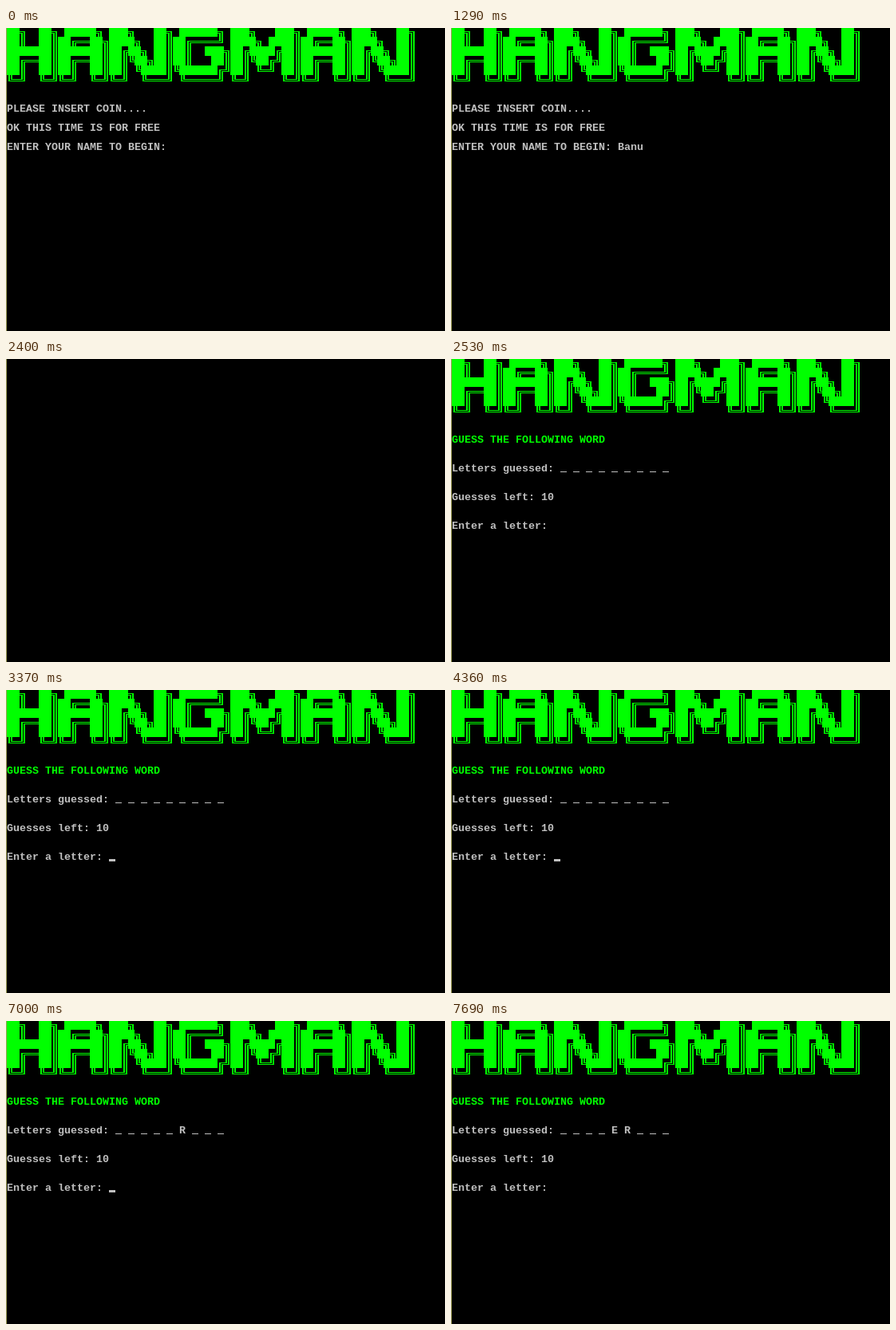
Recreate the animation shown at these times as an HTML page with a canvas. Size 550x380 px, loop 8000 ms.

```html
<!DOCTYPE html>
<html lang="en">
<head>
<meta charset="utf-8">
<title>Hangman console</title>
<style>
  html, body { margin: 0; width: 100%; height: 100%; overflow: hidden; background: #000; }
  canvas { display: block; }
</style>
</head>
<body>
<canvas id="stage" width="550" height="380"></canvas>
<script>
const ctx = document.getElementById('stage').getContext('2d');
const LOOP = 8000;
const CELL_W = 8, CELL_H = 12, LEFT = 1, TOP = -1;
const GREEN = '#00ff00', GREY = '#c0c0c0', EDGE = '#a0a058';
const PLAYER = 'Banuvo';

const BANNER = [
  '██╗  ██╗ █████╗ ███╗   ██╗ ██████╗ ███╗   ███╗ █████╗ ███╗   ██╗',
  '██║  ██║██╔══██╗████╗  ██║██╔════╝ ████╗ ████║██╔══██╗████╗  ██║',
  '███████║███████║██╔██╗ ██║██║  ███╗██╔████╔██║███████║██╔██╗ ██║',
  '██╔══██║██╔══██║██║╚██╗██║██║   ██║██║╚██╔╝██║██╔══██║██║╚██╗██║',
  '██║  ██║██║  ██║██║ ╚████║╚██████╔╝██║ ╚═╝ ██║██║  ██║██║ ╚████║',
  '╚═╝  ╚═╝╚═╝  ╚═╝╚═╝  ╚═══╝ ╚═════╝ ╚═╝     ╚═╝╚═╝  ╚═╝╚═╝  ╚═══╝'
];

// Arms of each corner: [right or left, down or up]
const CORNERS = { '╔': [1, 1], '╗': [-1, 1], '╚': [1, -1], '╝': [-1, -1] };

const name = length => ({ draw: drawIntro, typed: PLAYER.slice(0, length) });
const guess = (word, typed = '') => ({ draw: drawGame, word, typed });
const BLANK = '_________', WITH_R = '_____R___', WITH_ER = '____ER___';

// [start in ms, screen, cursor visible]
const STEPS = [
  [0, name(0)], [150, name(0), true], [270, name(1)], [700, name(2), true],
  [860, name(3)], [1290, name(4)], [1420, name(5)], [1570, name(6)],
  [1690, name(6), true], [2250, name(6)],
  [2400, null],
  [2530, guess(BLANK)], [3370, guess(BLANK), true], [3800, guess(BLANK)],
  [4360, guess(BLANK), true], [4640, guess(BLANK, 'r')], [4920, guess(BLANK, 'r'), true],
  [5200, guess(WITH_R)], [5910, guess(WITH_R), true], [6440, guess(WITH_R)],
  [7000, guess(WITH_R), true], [7140, guess(WITH_R, 'e')], [7570, guess(WITH_R, 'e'), true],
  [7690, guess(WITH_ER)]
];

function cellRect(col, row, x, y, w, h) {
  ctx.fillRect(LEFT + col * CELL_W + x, TOP + row * CELL_H + y, w, h);
}

function drawCorner(col, row, [h, v]) {
  const arms = (x, y) => {
    cellRect(col, row, h > 0 ? x : 0, y, h > 0 ? CELL_W - x : x + 2, 1);
    cellRect(col, row, x, v > 0 ? y : 0, 2, v > 0 ? CELL_H - y : y + 1);
  };
  const outerX = h > 0 ? 2 : 5, outerY = v > 0 ? 5 : 7;
  arms(outerX, outerY);
  arms(7 - outerX, 12 - outerY);
}

function drawBanner() {
  ctx.fillStyle = GREEN;
  BANNER.forEach((line, row) => [...line].forEach((char, col) => {
    if (char === '█') cellRect(col, row, 0, 0, CELL_W, CELL_H);
    else if (char === '║') [2, 5].forEach(x => cellRect(col, row, x, 0, 2, CELL_H));
    else if (char === '═') [5, 7].forEach(y => cellRect(col, row, 0, y, CELL_W, 1));
    else if (CORNERS[char]) drawCorner(col, row, CORNERS[char]);
  }));
}

function print(text, row, color = GREY) {
  ctx.fillStyle = color;
  ctx.fillText(text.replaceAll('_', ' '), LEFT, TOP + row * CELL_H + 10);
  [...text].forEach((char, col) => {
    if (char === '_') cellRect(col, row, 0, 10, CELL_W, 1);
  });
}

function prompt(label, typed, row, cursor) {
  const text = label + typed;
  print(text, row);
  if (cursor) cellRect(text.length, row, 0, 9, CELL_W, 3);
}

function drawIntro({ typed }, cursor) {
  print('PLEASE INSERT COIN....', 8);
  print('OK THIS TIME IS FOR FREE', 10);
  prompt('ENTER YOUR NAME TO BEGIN: ', typed, 12, cursor);
}

function drawGame({ word, typed }, cursor) {
  print('GUESS THE FOLLOWING WORD', 8, GREEN);
  print('Letters guessed: ' + [...word].join(' '), 11);
  print('Guesses left: 10', 14);
  prompt('Enter a letter: ', typed, 17, cursor);
}

function render(time) {
  const [, screen, cursor] = STEPS.findLast(([start]) => start <= time);
  ctx.fillStyle = '#000';
  ctx.fillRect(0, 0, 550, 380);
  ctx.fillStyle = EDGE;
  ctx.fillRect(0, 0, 1, 380);
  if (!screen) return;
  ctx.font = 'bold 13.333px "Liberation Mono", monospace';
  drawBanner();
  screen.draw(screen, cursor);
}

const startTime = performance.now();
function tick() {
  render((performance.now() - startTime) % LOOP);
  requestAnimationFrame(tick);
}
tick();
</script>
</body>
</html>
```
